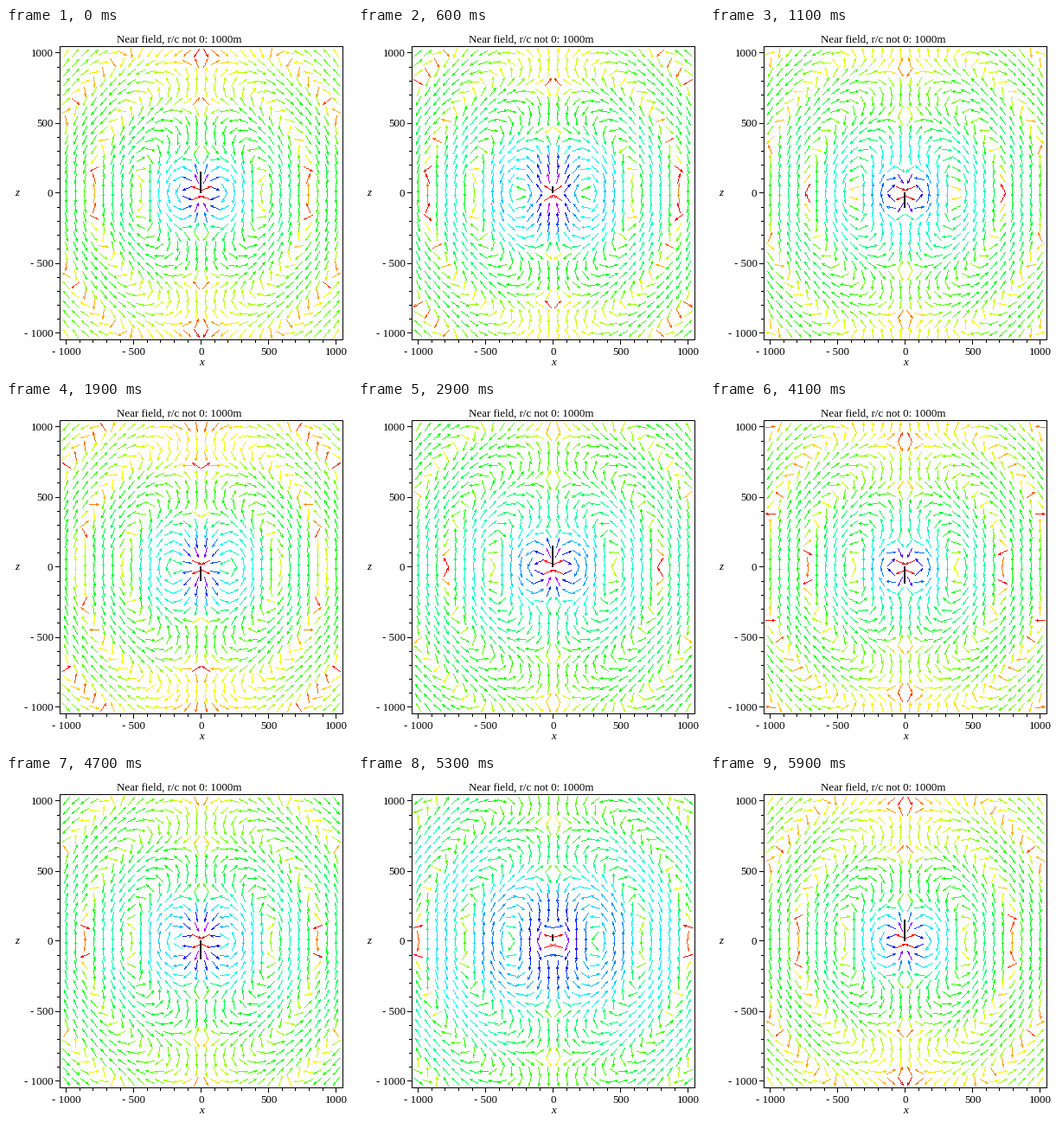
Recreate the animation shown at these times as a matplotlib script. Size 400x400 px, loop 6 s.

```python
import numpy as np
import matplotlib.pyplot as plt
from matplotlib.animation import FuncAnimation
from matplotlib.colors import hsv_to_rgb

SIZE, DPI, FRAMES = 400, 100, 60
CX, CY = 225.2, 190.5              # pixel position of the dipole
SX, SY = 0.156, 0.162              # pixels per metre
LEFT, RIGHT, TOP, BOTTOM = 62, 389, 21, 360
K = 2 * np.pi * 457e3 / 3e8        # wave number at 457 kHz
ROD = 150                          # dipole amplitude in metres
BLACK = (0, 0, 0)
GRID = np.linspace(-1000, 1000, 30)
STEP = GRID[1] - GRID[0]
X, Z = (g.ravel() for g in np.meshgrid(GRID, GRID))

plt.rcParams["font.family"] = "Liberation Serif"
fig = plt.figure(figsize=(SIZE / DPI, SIZE / DPI), dpi=DPI, facecolor="white")
ax = fig.add_axes([0, 0, 1, 1])
ax.axis("off")


def to_px(x, z):
    return np.stack([CX + SX * x, CY - SY * z], axis=-1)


def stroke(canvas, start, end, color):
    """Hard-edged lines one pixel wide, from arrays of start and end points."""
    a = np.rint(np.atleast_2d(start))
    d = np.rint(np.atleast_2d(end)) - a
    steps = np.maximum(np.abs(d).max(axis=1), 1)
    t = np.minimum(np.arange(steps.max() + 1) / steps[:, None], 1)
    pts = np.rint(a[:, None] + t[..., None] * d[:, None]).astype(int)
    shades = np.atleast_2d(color)[:, None]
    canvas[pts[..., 1], pts[..., 0]] = np.broadcast_to(shades, t.shape + (3,))


def field(phase):
    """Retarded electric field of an oscillating dipole along z."""
    r = np.hypot(X, Z)
    u = K * r
    sin, cos = X / r, Z / r
    wave = np.exp(1j * (u - phase)) / r**3
    e_r = 2 * cos * ((1 - 1j * u) * wave).real
    e_t = sin * ((1 - 1j * u - u**2) * wave).real
    return e_r * sin + e_t * cos, e_r * cos - e_t * sin


def hues(ex, ez):
    level = np.log(np.hypot(ex, ez))
    h = (level - level.min()) / np.ptp(level)
    return hsv_to_rgb(np.stack([h, np.ones_like(h), np.ones_like(h)], axis=-1))


def draw_arrows(canvas, ex, ez):
    """Arrows of equal length, centred on the grid, with a narrow head."""
    mag = np.hypot(ex, ez)
    dx, dz = STEP * ex / mag, STEP * ez / mag
    colors = hues(ex, ez)

    def point(along, across):
        return to_px(X + along * dx - across * dz, Z + along * dz + across * dx)

    tip = point(0.5, 0)
    for start in (point(-0.5, 0), point(0.25, 0.08), point(0.25, -0.08)):
        stroke(canvas, start, tip, colors)


def label(x, y, text, ha="center", **style):
    ax.text(x, y, text, ha=ha, va="center_baseline", fontsize=13 * 72 / DPI,
            color="black", **style)


def draw_axes(canvas):
    corners = np.array([(LEFT, TOP), (RIGHT, TOP), (RIGHT, BOTTOM),
                        (LEFT, BOTTOM)])
    stroke(canvas, corners, np.roll(corners, 1, axis=0), BLACK)
    for v in range(-1000, 1001, 100):
        major = v % 500 == 0
        size = 5 if major else 3
        x, y = to_px(v, v)
        stroke(canvas, (x, BOTTOM), (x, BOTTOM + size), BLACK)
        stroke(canvas, (LEFT - size, y), (LEFT, y), BLACK)
        if major:
            text = str(v).replace("-", "- ")
            label(x + 0.5, 373, text)
            label(54.5, y, text, ha="right")
    label(200, 12, "Near field, r/c not 0: 1000m")
    label(226, 386, "x", style="italic")
    label(12.5, 190, "z", style="italic")


def draw_rod(canvas, height):
    for x in (224, 225):
        stroke(canvas, (x, CY), (x, CY - SY * height), BLACK)


base = np.ones((SIZE, SIZE, 3))
draw_axes(base)
picture = ax.imshow(base, extent=(0, SIZE, SIZE, 0), aspect="auto",
                    interpolation="nearest")


def update(i):
    # two full oscillations; the last pose equals the first
    phase = 4 * np.pi * i / (FRAMES - 1)
    canvas = base.copy()
    draw_arrows(canvas, *field(phase))
    draw_rod(canvas, ROD * np.cos(phase))
    picture.set_data(canvas)
    return picture,


anim = FuncAnimation(fig, update, frames=FRAMES, interval=100,
                     repeat=True, repeat_delay=0)
plt.show()
```
